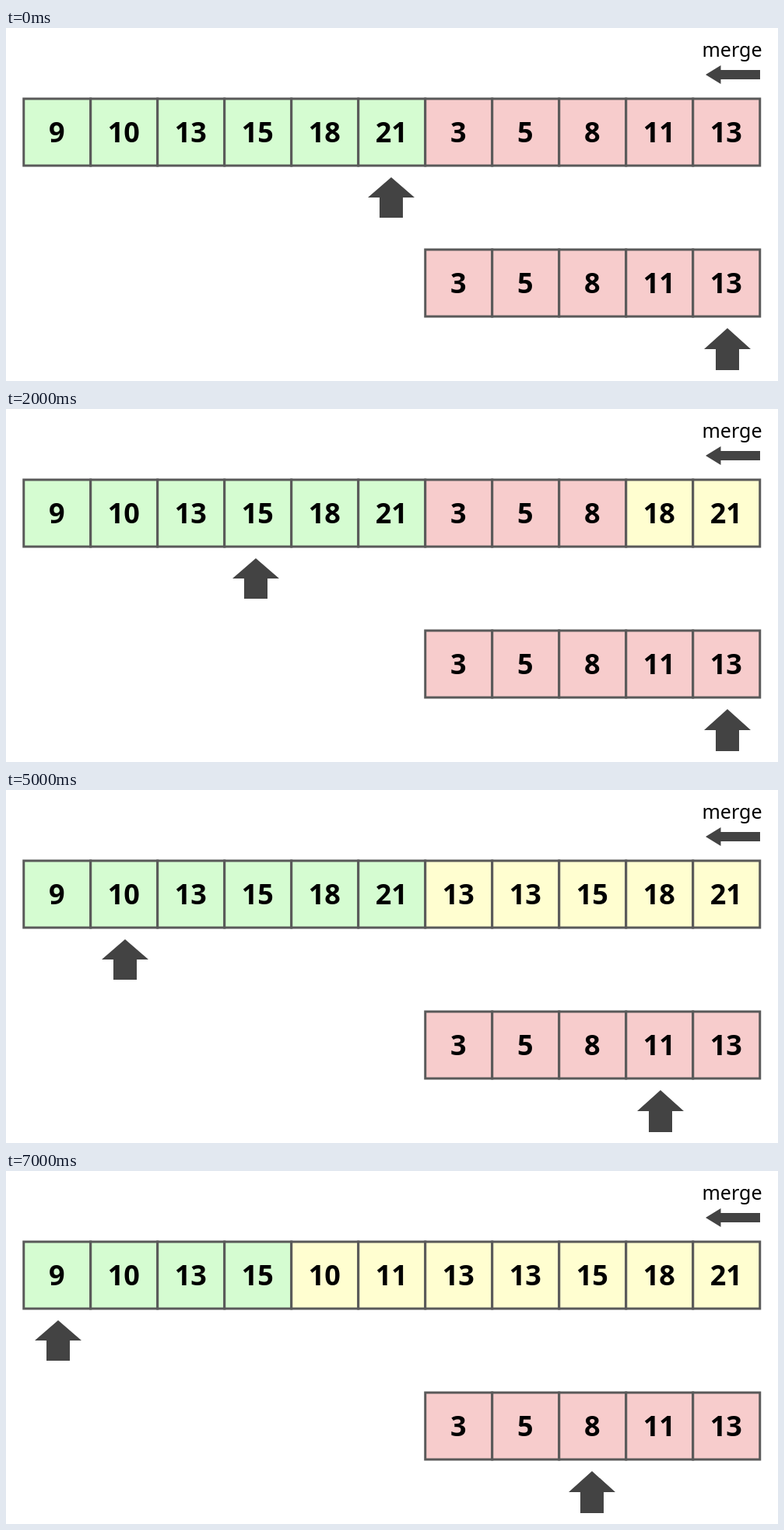
An HTML page that plays this animation: 992x454 px, repeating every 8000 ms.

```html
<!DOCTYPE html>
<html lang="en">
<head>
<meta charset="utf-8">
<title>Merge from the right</title>
<style>
  html, body { margin: 0; width: 100%; height: 100%; overflow: hidden; background: #fff; }
  svg { display: block; }
  text { font-family: "Noto Sans", "Open Sans", sans-serif; text-anchor: middle; }
  .num { font-size: 36px; font-weight: 700; }
  .label { font-size: 25px; }
  .cell { stroke: #595959; stroke-width: 3; }
  .arrow { fill: #434343; }
</style>
</head>
<body>
<svg width="992" height="454" viewBox="0 0 992 454">
  <text class="label" x="933" y="37">merge</text>
  <path class="arrow" d="M899 60L918.500 48V54H969V66H918.500V72Z"/>
  <g id="cells"></g>
  <path id="leftArrow" class="arrow" d="M0 192L30 218H15V244H-15V218H-30Z"/>
  <path id="rightArrow" class="arrow" d="M0 386L30 413H15V440H-15V413H-30Z"/>
</svg>
<script>
const NS = "http://www.w3.org/2000/svg";
const GREEN = "#d5fcd1", PINK = "#f7cccc", YELLOW = "#fffed0";
const SIZE = 86, STEP = 1000, STEPS = 8;
const left = [9, 10, 13, 15, 18, 21];
const right = [3, 5, 8, 11, 13];
const leftX = [67, 153, 239, 321, 409, 495];
const rightX = [581, 667, 753, 841, 927];
const cells = document.getElementById("cells");

function add(tag, attrs) {
  const node = cells.appendChild(document.createElementNS(NS, tag));
  for (const key in attrs) node.setAttribute(key, attrs[key]);
  return node;
}

function addCell(col, y, value, fill) {
  const x = 23 + SIZE * col - 0.25;
  const box = add("rect", { class: "cell", x, y, width: SIZE, height: SIZE, fill });
  const text = add("text", { class: "num", x: x + SIZE / 2 - 0.5, y: y + 56 });
  text.textContent = value;
  return { box, text };
}

const start = [...left, ...right];
const row = start.map((v, i) => addCell(i, 91, v, i < left.length ? GREEN : PINK));
right.forEach((v, i) => addCell(left.length + i, 285, v, PINK));

// Merge from the right end; the left run wins ties.
function mergeState(step) {
  let i = left.length - 1, j = right.length - 1;
  const values = start.slice(), first = start.length - step;
  for (let k = start.length - 1; k >= first; k--)
    values[k] = left[i] >= right[j] ? left[i--] : right[j--];
  return { values, first, i, j };
}

function place(id, x) {
  document.getElementById(id).setAttribute("transform", `translate(${x})`);
}

function show(step) {
  const { values, first, i, j } = mergeState(step);
  row.forEach(({ box, text }, k) => {
    box.setAttribute("fill", k >= first ? YELLOW : k < left.length ? GREEN : PINK);
    text.textContent = values[k];
  });
  place("leftArrow", leftX[i]);
  place("rightArrow", rightX[j]);
}

let shown = -1;
const origin = performance.now();
function tick() {
  const step = Math.floor((performance.now() - origin) / STEP) % STEPS;
  if (step !== shown) show(shown = step);
  requestAnimationFrame(tick);
}
tick();
</script>
</body>
</html>
```
